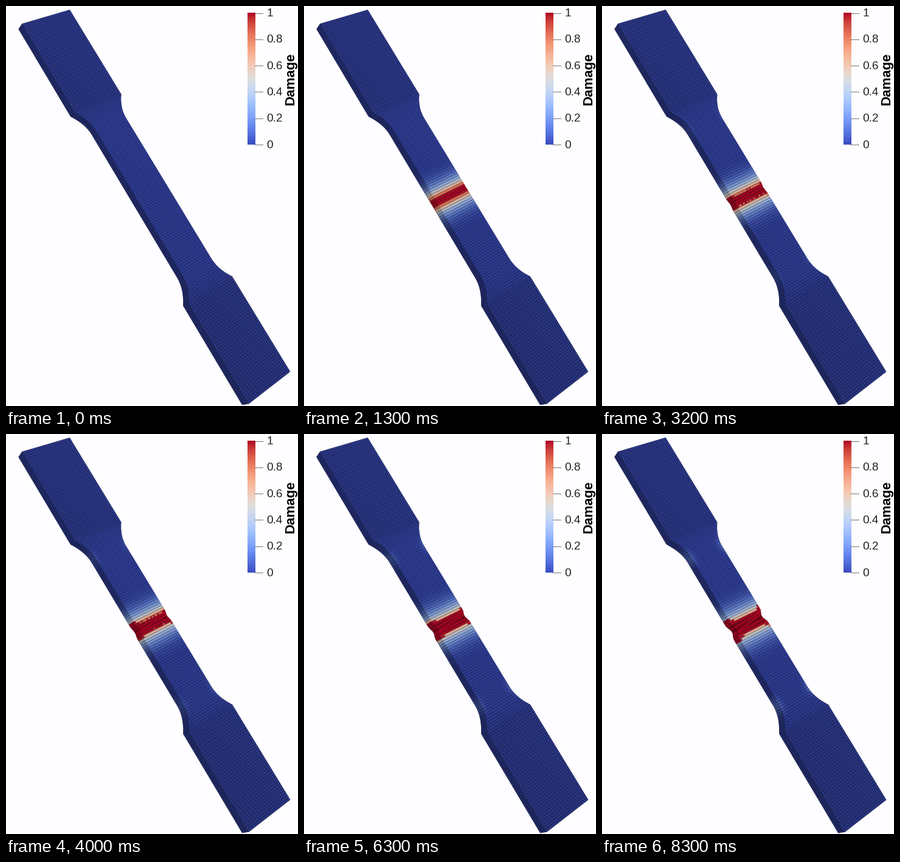
Recreate the animation shown at these times as a matplotlib script. Size 480 by 658 pixels, loop 8.4 s.

```python
import numpy as np
import matplotlib.pyplot as plt
from matplotlib.animation import FuncAnimation
from matplotlib.collections import PolyCollection

W, H, DPI = 480, 658, 64
FRAMES, STEP = 84, 100
LENGTH = 705            # specimen length in pixels
GRIP, FILLET, INSET = 0.248, 0.06, 0.175
COLS, LAYERS = 22, 3
PT = 72 / DPI
CMAP = plt.get_cmap("coolwarm")
rng = np.random.default_rng(4)

# Perspective map of the front face: u along the length, v across the width
TL, TR, BL, BR = (np.array([x, y, 1.0]) for x, y in
                  [(26.5, 29.3), (104.7, 6.3), (399, 654.3), (467, 601.5)])
k = np.linalg.solve(np.column_stack([TL, BL, TR]), BR)
P0, PU, PV = -k[0] * TL, k[1] * BL, k[2] * TR


def project(u, v, w=0.0):
    """Screen position of (u, v) at depth w behind the front face."""
    u, v, w = np.broadcast_arrays(u, v, w)
    p = P0 + u[..., None] * (PU - P0) + v[..., None] * (PV - P0)
    p = p[..., :2] / p[..., 2:]
    depth = np.stack([-5.8 - 5 * u, 8.7 - 7 * u], -1)
    return p + w[..., None] * depth


def inset(u):
    """Distance of the outline from the grip edge, with rounded shoulders."""
    t = np.clip((0.5 - np.abs(u - 0.5) - GRIP) / FILLET, 0, 1)
    return INSET * (1 - (1 - t) ** 2)


def centres(a, b, n):
    return a + (np.arange(n) + 0.5) * (b - a) / n


rows = np.concatenate([centres(0, GRIP, 41), centres(GRIP, 1 - GRIP, 85),
                       centres(1 - GRIP, 1, 41)])
N = len(rows)
cols = centres(0, 1, COLS)
noise = rng.uniform(-1, 1, (N, COLS))
tilt = rng.uniform(-1, 1, N)
S = (rows - 0.5) * LENGTH


def key(f, values):
    return np.interp(f, [0, 7, 13, 23, 32, 48, 63, 83], values)


def damage(f):
    s, c = np.abs(S)[:, None], np.abs(2 * cols - 1)[None, :]
    ramp = np.clip((f - 1) / 10, 0, 1) ** 0.9
    grow = key(f, [1, 1, 1, 1.03, 1.06, 1.09, 1.1, 1.13])
    d = ramp * (0.58 * np.exp(-(s / (26 * grow)) ** 2)
                + 0.48 * np.exp(-(s / 12) ** 2))
    core = key(f, [-4, -4, 3, 5.5, 8, 9.3, 9.6, 10])
    ends = key(f, [0, 0, 0, 1, 3, 6, 6.5, 8.5])
    rough = key(f, [0, 0, 0.2, 0.6, 2.6, 1.5, 1.3, 1.3])
    edge = core + ends * c ** 5 + rough * noise
    d = np.maximum(d, 1 - np.clip((s - edge) / 3, 0, 1))
    # faint stress at the shoulders
    near = np.exp(-((s - 0.195 * LENGTH) / 14) ** 2) * c ** 6
    d = d + key(f, [0, 0, 0, 0.02, 0.05, 0.1, 0.11, 0.16]) * near
    return np.clip(d, 0, 1)


def opened(f):
    """Row positions after the crack has opened."""
    gap = key(f, [0, 0, 0.3, 1, 1.6, 3, 3.4, 5])
    a = np.abs(S)
    move = (gap / 2 * np.sign(S) * np.clip(a / 7, 0, 1)
            * (0.12 + 0.88 * np.exp(-a / 90)))
    mid = rows + move / LENGTH
    loose = np.exp(-(S / 7) ** 2) * gap / LENGTH
    u = (mid[:, None] + (1.5 * tilt * loose)[:, None] * (cols - 0.5)
         + 0.1 * noise * loose[:, None])
    return mid, u, 0.012 * gap * np.exp(-(S / 5) ** 2)


def shade(d, lit, gain):
    rgba = CMAP(np.ravel(d))
    level = lit + gain * np.clip(1.5 * np.ravel(d), 0, 1)
    rgba[:, :3] *= level[:, None]
    return rgba


fig = plt.figure(figsize=(W / DPI, H / DPI), dpi=DPI, facecolor="#fefdff")
ax = fig.add_axes([0, 0, 1, 1])

# Colour bar
ax.imshow(np.linspace(1, 0, 256)[:, None], cmap=CMAP, aspect="auto",
          extent=(397, 410, 228.5, 11.5), interpolation="bilinear")
ax.set_xlim(0, W)
ax.set_ylim(H, 0)
ax.axis("off")
for i, label in enumerate(["0", "0.2", "0.4", "0.6", "0.8", "1"]):
    y = 228 - 43.3 * i
    ax.plot([409, 421.5], [y, y], color="#777777", lw=1 * PT)
    ax.text(428, y + 5.5, label, family="Liberation Sans", size=19 * PT,
            color="#222222", va="baseline")
ax.text(474, 119.5, "Damage", family="Liberation Sans", weight="bold",
        size=22.2 * PT, color="black", rotation=90, rotation_mode="anchor",
        ha="center", va="baseline")


def strips(z):
    c = PolyCollection([], edgecolors="face", linewidths=0.5, zorder=z)
    return ax.add_collection(c, autolim=False)


def beads(count, px, z):
    return ax.scatter(np.zeros(count), np.zeros(count), s=(px * PT) ** 2,
                      linewidths=0, zorder=z)


in_grip = np.abs(rows - 0.5) > 0.5 - GRIP
front_px = np.repeat(np.where(in_grip, 3.2, 3.4), COLS)
side_strips, side_beads = strips(2), beads(N * LAYERS, 3.2, 3)
face_strips, face_beads = strips(4), beads(N * COLS, front_px, 5)
layer = centres(0, 1, LAYERS)[::-1]


def quads(a, b):
    return np.stack([a[:-1], b[:-1], b[1:], a[1:]], 1)


def update(f):
    d = damage(f)
    mid, u, neck = opened(f)
    cuts = np.concatenate([[0], (mid[1:] + mid[:-1]) / 2, [1]])
    cuts[0] = mid[0] - rows[0]
    cuts[-1] = 1 + mid[-1] - rows[-1]
    e = inset(cuts) + np.interp(cuts, mid, neck)
    left, right = project(cuts, e), project(cuts, 1 - e)
    back = project(cuts, e, 1.0)

    side_strips.set_verts(quads(back, left))
    side_strips.set_color(shade(d[:, 0], 0.38, 0.14))
    face_strips.set_verts(quads(left, right))
    face_strips.set_color(shade(d.mean(1), 0.44, 0.12))

    m = (inset(rows) + neck)[:, None]
    face = project(u, m + cols * (1 - 2 * m))
    face_beads.set_offsets(face.reshape(-1, 2))
    face_beads.set_facecolor(shade(d, 0.77, 0.13))

    side = project(u[:, :1], m + 0.004, layer[None, :])
    side_beads.set_offsets(side.reshape(-1, 2))
    side_beads.set_facecolor(shade(np.repeat(d[:, 0], LAYERS), 0.55, 0.22))
    return side_strips, side_beads, face_strips, face_beads


anim = FuncAnimation(fig, update, frames=FRAMES, interval=STEP,
                     init_func=lambda: update(0), repeat=True,
                     repeat_delay=0, blit=False)
plt.show()
```
